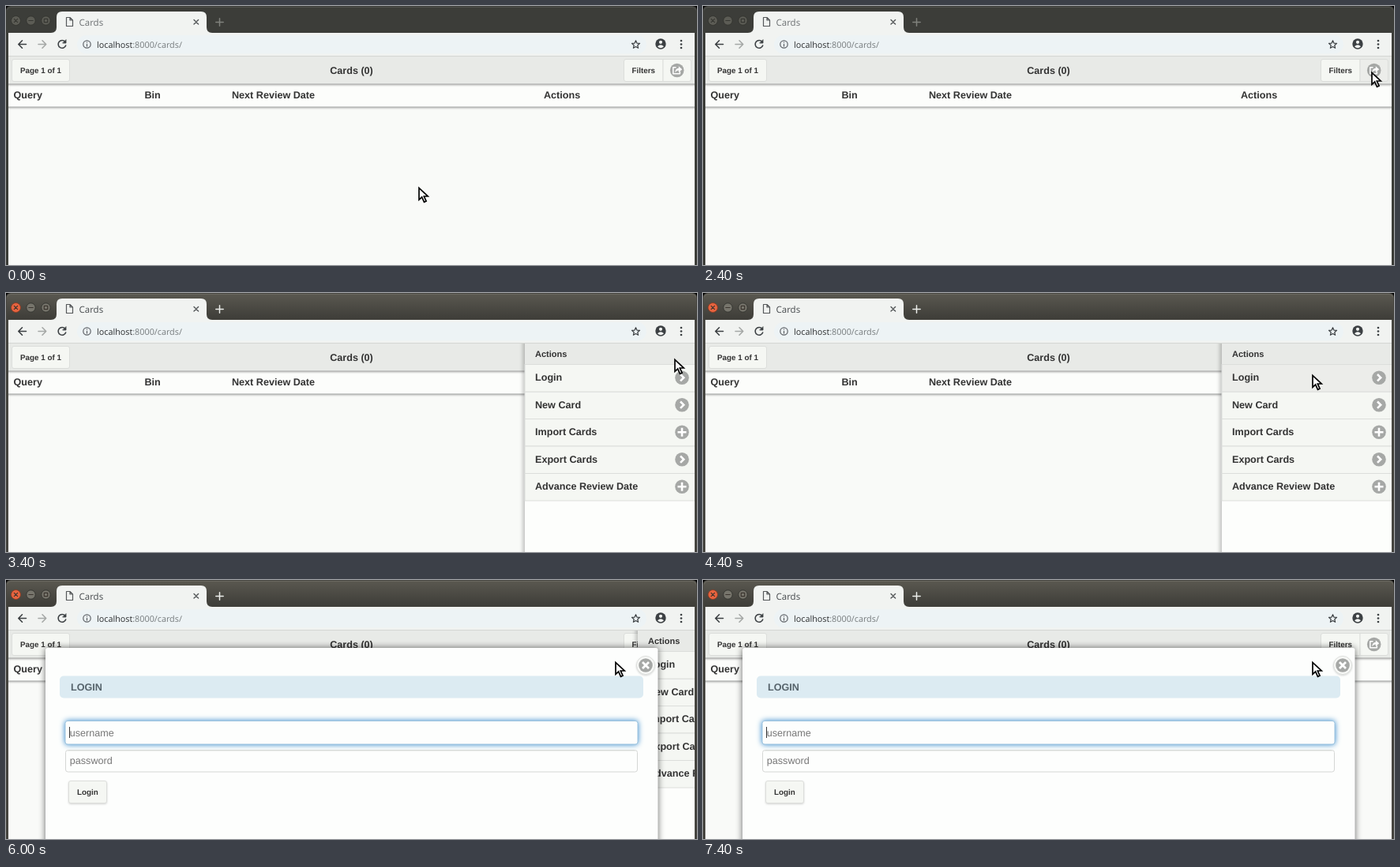
An HTML page that plays this animation: 875 by 328 pixels, repeating every 8000 ms.

```html
<!DOCTYPE html>
<html lang="en">
<head>
<meta charset="utf-8">
<title>Cards</title>
<style>
  html, body { margin: 0; width: 100%; height: 100%; overflow: hidden; background: #000; }
  svg { display: block; width: 875px; height: 328px; }
  text { font: bold 12.6px "Liberation Sans", Arial, sans-serif; fill: #333; text-rendering: geometricPrecision; }
  .mini { font-size: 9.84px; }
  .sub { font-size: 11px; }
  .hint { font-weight: normal; fill: #777; }
  .ui { font: 10.8px "Open Sans", "Noto Sans", sans-serif; fill: #2b2d2f; }
  .btn { fill: #f5f7f3; stroke: #dcdedb; }
  .bar { filter: drop-shadow(0 1px 1.6px rgba(0,0,0,.5)); }
  .pop { filter: drop-shadow(0 0 4px rgba(0,0,0,.6)); }
  .side { filter: drop-shadow(-3px 0 2px rgba(0,0,0,.2)); }
  .glow { filter: drop-shadow(0 0 3.5px #38c); }
  .lift { filter: drop-shadow(0 1px 1px rgba(0,0,0,.16)); }
  .line { fill: none; stroke-linecap: round; stroke-linejoin: round; }
</style>
</head>
<body>
<svg id="stage" viewBox="0 0 875 328" xmlns="http://www.w3.org/2000/svg">
  <defs>
    <linearGradient id="title" x1="0" y1="0" x2="0" y2="1">
      <stop offset="0" stop-color="#5a5850"/>
      <stop offset=".9" stop-color="#403f3a"/>
    </linearGradient>
    <clipPath id="view"><rect x="3" y="64" width="869" height="264"/></clipPath>
  </defs>

  <!-- window frame -->
  <path id="frame" d="M0 328V6Q0 0 6 0H869Q875 0 875 6V328Z"/>
  <path id="titlebar" d="M1 34V6Q1 1 6 1H869Q874 1 874 6V34Z"/>
  <path id="rim" class="line" d="M1.5 5Q2 1.500 6 1.500H869Q873 1.500 873.500 5"/>
  <g id="knobs">
    <circle id="close" cx="12.500" cy="18.500" r="6"/>
    <circle class="knob" cx="31.500" cy="18.500" r="5.700"/>
    <circle class="knob" cx="50.500" cy="18.500" r="5.700"/>
    <path id="marks" class="line" stroke-width="1.200"
      d="M10.300 16.300l4.400 4.400m0-4.400l-4.400 4.400M28.800 18.500h5.400M48.300 16.300h4.400v4.400h-4.400z"/>
  </g>
  <path d="M57 34Q64 34 64 27V14Q64 7 71 7H247Q254 7 254 14V27Q254 34 261 34Z" fill="#f1f3f1"/>
  <path class="line" stroke="#55585a" stroke-width="1.200" d="M76.500 14.500h4.500l3.500 3.500v7.500h-8zM81 14.500v3.500h3.500"/>
  <text id="tabName" class="ui" x="92.500" y="24.500" style="font-size:11.5px">Cards</text>
  <path class="line" stroke="#55585a" stroke-width="1.400" d="M238 17.500l5.600 5.600m0-5.600l-5.600 5.600"/>
  <path id="plus" class="line" stroke-width="1.500" d="M270.500 15.800v9.400M265.800 20.500h9.400"/>

  <!-- toolbar -->
  <rect x="3" y="34" width="869" height="30" fill="#f1f3f1"/>
  <rect x="90" y="37" width="721" height="23.500" rx="11.700" fill="#edf3f5"/>
  <rect x="3" y="63" width="869" height="1" fill="#d4d6d3"/>
  <g class="line" stroke="#3c4043" stroke-width="1.600">
    <path d="M25.500 48.500h-9.500m4.500-4.700l-4.700 4.700l4.700 4.700"/>
    <path stroke="#a5a8a6" d="M41 48.500h9.500m-4.500-4.700l4.700 4.700l-4.700 4.700"/>
    <path d="M74.800 45.200A4.900 4.900 0 1 0 75.700 50"/>
    <path d="M76 43v4h-4z" fill="#3c4043" stroke-width=".8"/>
    <circle cx="102.500" cy="48.500" r="4.700" stroke="#5f6368" stroke-width="1.200"/>
    <path d="M102.500 48.300v2.600M102.500 46.100v.1" stroke="#5f6368" stroke-width="1.300"/>
    <path id="star" stroke-width="1.200"/>
  </g>
  <text class="ui" x="115" y="52.500">localhost<tspan fill="#757a7c">:8000/cards/</tspan></text>
  <circle cx="829" cy="48" r="6.700" fill="#3c4043"/>
  <circle cx="829" cy="45.800" r="2.100" fill="#f1f3f1"/>
  <path d="M825 51.300Q829 47.300 833 51.300Q829 55 825 51.300Z" fill="#f1f3f1"/>
  <g fill="#3c4043">
    <circle cx="855" cy="44" r="1.350"/><circle cx="855" cy="48.500" r="1.350"/><circle cx="855" cy="53" r="1.350"/>
  </g>

  <g clip-path="url(#view)">
    <!-- page -->
    <rect x="3" y="64" width="869" height="264" fill="#f9faf8"/>
    <rect class="bar" x="-5" y="98" width="885" height="29.500" fill="#fcfdfb"/>
    <rect class="bar" x="-5" y="60" width="885" height="38.500" fill="#e8eae7"/>
    <text x="9.500" y="117">Query</text>
    <text x="175.500" y="117">Bin</text>
    <text x="286" y="117">Next Review Date</text>
    <text x="681" y="117">Actions</text>
    <rect class="btn" x="7.500" y="67.500" width="73" height="28" rx="2.500"/>
    <text class="mini" x="18" y="85">Page 1 of 1</text>
    <text x="437.500" y="85.500" text-anchor="middle">Cards (0)</text>
    <path id="filters" class="btn" d="M832 67.500H785Q782.500 67.500 782.500 70V93Q782.500 95.500 785 95.500H832Z"/>
    <path id="menuBtn" class="btn" d="M832 67.500H865Q867.500 67.500 867.500 70V93Q867.500 95.500 865 95.500H832Z"/>
    <text class="mini" x="792.500" y="85">Filters</text>
    <circle cx="849.700" cy="81.500" r="8.800" fill="#a6a8a6"/>
    <path class="line" stroke="#fff" stroke-width="1.500" d="M848 77.800h-3.200v8h8.500v-2.300"/>
    <path d="M847.300 84.300Q847.500 79 851.800 78.800V76.200L856.200 80.300L851.800 84V81.500Q849 81.400 847.300 84.300Z" fill="#fff"/>

    <!-- side menu -->
    <g id="panel">
      <rect class="side" x="657" y="60" width="225" height="280" fill="#fdfefc"/>
      <rect x="657" y="64" width="215" height="27" fill="#e8eae7"/>
      <text class="sub" x="670" y="81">Actions</text>
      <g id="rows"></g>
    </g>

    <!-- dialog -->
    <g id="dialog">
      <rect class="pop" x="50" y="86" width="775.500" height="260" rx="2.500" fill="#fdfefd"/>
      <rect x="68" y="121.500" width="739" height="28" rx="5" fill="#dcebf2"/>
      <text x="82" y="140" style="fill:#56636b">LOGIN</text>
      <rect class="glow" x="75" y="178.500" width="725" height="29.500" rx="3" fill="#fdfefd" stroke="#9cc3de"/>
      <text class="hint" x="80.800" y="197.500">username</text>
      <rect id="caret" x="80" y="186" width="1" height="14" fill="#333"/>
      <rect x="75.500" y="215.500" width="724" height="27.500" rx="3" fill="#fdfefd" stroke="#d5d7d5"/>
      <path class="line" stroke="#eceeec" d="M78 216.700H797"/>
      <text class="hint" x="80.800" y="233">password</text>
      <rect class="btn lift" x="79.500" y="254.500" width="48" height="28" rx="2.500"/>
      <text class="mini" x="90" y="272">Login</text>
      <circle class="lift" cx="810" cy="108" r="11.500" fill="#f8f9f7" stroke="#dcdedb"/>
      <circle cx="810" cy="108" r="8.800" fill="#a6a8a6"/>
      <path class="line" stroke="#fff" stroke-width="2.800" style="stroke-linecap:butt" d="M806 104l8 8m0-8l-8 8"/>
    </g>
  </g>

  <circle id="click" r="19" fill="#e9e56a" fill-opacity=".55"/>
  <path id="cursor" d="M1 1.500V16.300L4.600 13L7.500 19.300L10.100 18.100L7.300 12H12.200Z"
    fill="#fff" stroke="#000" stroke-width="1.700"/>
</svg>
<script>
  const LOOP = 8000;
  const $ = id => document.getElementById(id);
  const set = (el, attrs) => { for (const k in attrs) el.setAttribute(k, attrs[k]); };
  const show = (el, on) => el.setAttribute("visibility", on ? "visible" : "hidden");
  const within = (t, a, b) => t >= a && t < b;

  // [from ms, x, y]
  const path = [
    [0, 522, 229], [600, 585, 189], [800, 639, 161], [1000, 705, 137],
    [1200, 759, 119], [1400, 790, 107], [1600, 821, 94], [1800, 834, 89],
    [2000, 842, 84], [2200, 845, 84], [2400, 846, 83], [3800, 827, 89],
    [4000, 790, 99], [4200, 779, 102], [4400, 771, 103]
  ];
  const cursorAt = t => path.filter(p => p[0] <= t).pop();

  // [from ms, horizontal offset], 230 is fully off stage
  const slides = [[0, 230], [3200, 42], [3400, 0], [6000, 143], [6200, 230]];
  const slideAt = t => slides.filter(s => s[0] <= t).pop()[1];

  const star = Array.from({ length: 10 }, (_, i) => {
    const a = i * Math.PI / 5, r = i % 2 ? 2.4 : 5.3;
    return (797.5 + r * Math.sin(a)).toFixed(2) + " " + (49 - r * Math.cos(a)).toFixed(2);
  });
  $("star").setAttribute("d", "M" + star.join("L") + "Z");

  const items = ["Login", "New Card", "Import Cards", "Export Cards", "Advance Review Date"];
  const icons = { arrow: "M854 103l4.200 4.200l-4.200 4.200", plus: "M856 101.700v11M850.500 107.200h11" };
  $("rows").innerHTML = items.map((name, i) => {
    const icon = i === 2 || i === 4 ? icons.plus : icons.arrow;
    return `<g transform="translate(0 ${(i * 34.5).toFixed(1)})">
      <rect ${i ? "" : 'id="first"'} x="657" y="90.500" width="217" height="34.500" fill="#f5f7f3" stroke="#dcdedb"/>
      <text x="670" y="111.300">${name}</text>
      <circle cx="856" cy="107.200" r="8.800" fill="#a6a8a6"/>
      <path class="line" stroke="#fff" stroke-width="2.600" style="stroke-linecap:butt;stroke-linejoin:miter" d="${icon}"/>
    </g>`;
  }).join("");
  // the first row comes last so its glow lies over its neighbour
  $("rows").append($("rows").firstElementChild);

  function paintWindow(active) {
    $("frame").setAttribute("fill", active ? "#45443f" : "#3b3c38");
    $("titlebar").setAttribute("fill", active ? "url(#title)" : "#3c3d39");
    $("rim").setAttribute("stroke", active ? "#6b6960" : "#51524d");
    set($("close"), { fill: active ? "#e9643f" : "#5c5c55", stroke: active ? "#8a3d25" : "#343530" });
    document.querySelectorAll(".knob").forEach(k =>
      set(k, { fill: active ? "#77756c" : "#5c5c55", stroke: "#343530" }));
    $("marks").setAttribute("stroke", active ? "#3b352f" : "#363732");
    $("plus").setAttribute("stroke", active ? "#eceeeb" : "#80827d");
    $("tabName").style.fill = active ? "#45494c" : "#6c7072";
  }

  function draw(t) {
    const [, x, y] = cursorAt(t);
    const press = within(t, 3000, 3200), pick = within(t, 5800, 6000);
    const offset = slideAt(t);

    paintWindow(t >= 3000);
    $("cursor").setAttribute("transform", `translate(${x} ${y})`);
    set($("click"), { cx: x, cy: y });
    show($("click"), press || pick);

    $("filters").style.fill = within(t, 1600, 1800) ? "#ecedea" : "";
    $("menuBtn").style.fill = press ? "#e6e8e5" : within(t, 1800, 3000) ? "#ecedea" : "";
    $("menuBtn").classList.toggle("glow", press);

    $("panel").setAttribute("transform", `translate(${offset} 0)`);
    show($("panel"), offset < 230);
    set($("first"), {
      fill: pick ? "#e6e8e5" : within(t, 4000, 5800) ? "#ecedea" : "#f5f7f3",
      stroke: pick ? "#a9c8dc" : "#dcdedb"
    });
    $("first").classList.toggle("glow", pick);

    show($("dialog"), t >= 6000);
    show($("caret"), within(t, 6000, 6600) || t >= 7400);
  }

  const start = performance.now();
  function tick() {
    draw((performance.now() - start) % LOOP);
    requestAnimationFrame(tick);
  }
  tick();
</script>
</body>
</html>
```
